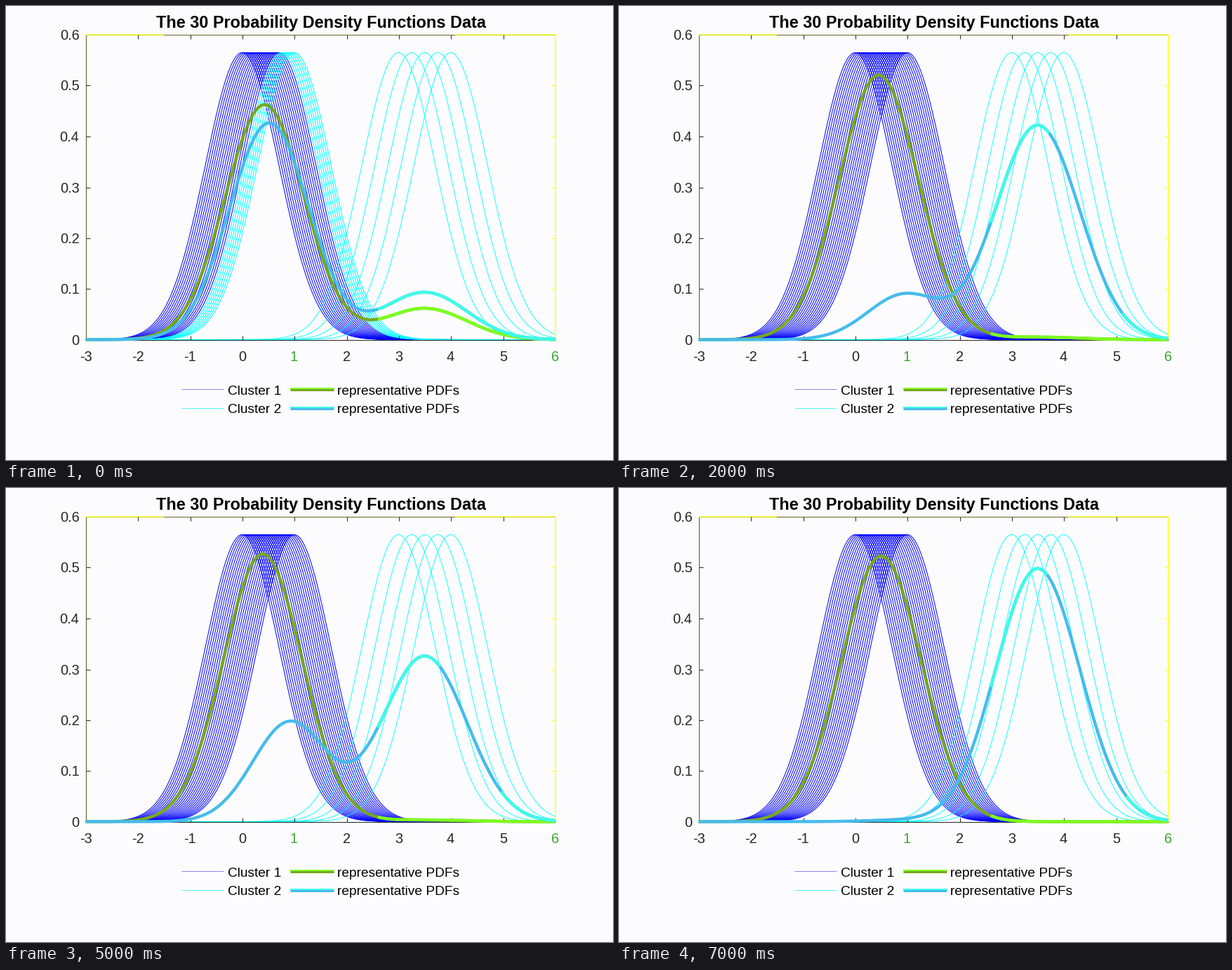
These frames come from a looping animation (865 px wide and 647 px high, 8000 ms). A matplotlib script:

```python
import numpy as np
import matplotlib.pyplot as plt
from matplotlib.animation import FuncAnimation
from matplotlib.patches import Circle, Rectangle

W, H, DPI = 865, 647, 100
PT = 72 / DPI  # points per pixel
LEFT, RIGHT, TOP, BASE = 113.5, 782.5, 40.5, 475.5

BG, INK, YELLOW, OLIVE = "#fcfcfe", "#262626", "#ffff20", "#6a6628"
BLUE, CYAN = "#0000ff", "#00ffff"
GREEN, LIME = "#77a81f", "#7dff20"
SKY, AQUA = "#45bcec", "#3ffbe9"

plt.rcParams["font.family"] = "Liberation Sans"
fig = plt.figure(figsize=(W / DPI, H / DPI), dpi=DPI, facecolor=BG)
ax = fig.add_axes([0, 0, 1, 1])
ax.set_xlim(0, W)
ax.set_ylim(H, 0)
ax.axis("off")


def px(x):
    return LEFT + (x + 3) * (RIGHT - LEFT) / 9


def py(y):
    return BASE - y * (BASE - TOP) / 0.6


def snap(v):
    return round(v - 0.5) + 0.5


def line(xs, ys, color, width=1.0, z=2):
    return ax.plot(xs, ys, color=color, lw=width * PT, zorder=z,
                   solid_capstyle="butt")[0]


def text(x, y, s, size, color=INK, **kw):
    ax.text(x, y, s, fontsize=size * PT, color=color, zorder=6,
            va="baseline", **kw)


# Densities
X = np.linspace(-3, 6, 901)
PX = px(X)


def gauss(mean, var=0.5):
    return np.exp(-(X - mean) ** 2 / (2 * var)) / np.sqrt(2 * np.pi * var)


NEAR = [gauss(m) for m in np.linspace(0, 1, 25)]
FAR = [gauss(m) for m in np.linspace(3, 4, 5)]
FAR_MEAN = np.mean(FAR, axis=0)


def representative(far, mean):
    """Average of all members: share `far` on the right, rest around mean."""
    edge = min(mean, 1 - mean)
    spread = edge ** 2 * (1 - edge) / (1 + edge)
    return (1 - far) * gauss(mean, 0.5 + spread) + far * FAR_MEAN


def ease(span, t):
    """Share between two key values, speeding up on a logistic curve."""
    a, b = (np.log(v / (1 - v)) for v in span)
    return 1 / (1 + np.exp(-a - (b - a) * t ** 1.78))


# Each run of the clustering: step count, then for both clusters
# the far share and the near centre at its start and end.
RUNS = [
    (3, [((.123, .010), (.43, .45)), ((.186, .842), (.52, .95))]),
    (5, [((.037, .0001), (.29, .50)), ((.227, .994), (.84, 1.0))]),
]
STEPS = [[representative(ease(far, t), np.interp(t, (0, 1), mean))
          for far, mean in clusters]
         for count, clusters in RUNS for t in np.linspace(0, 1, count)]


def distance(f, g):
    return np.sum((f - g) ** 2)


near_lines = [line(PX, py(f), BLUE) for f in NEAR]
for f in FAR:
    line(PX, py(f), CYAN, 0.9)
reps = [(line(PX, PX, base, 4.4, z), line(PX, PX, bright, 4.4, z))
        for base, bright, z in ((GREEN, LIME, 4), (SKY, AQUA, 5))]

# Frame, ticks and labels
line([LEFT, LEFT], [TOP, BASE], OLIVE, 1.2, 3)
line([LEFT, RIGHT], [BASE, BASE], INK, z=3)
line([LEFT, RIGHT], [TOP, TOP], OLIVE, z=3)
line([RIGHT, RIGHT], [TOP, BASE], YELLOW, 1.5, 3)
for xs in ([LEFT, 225], [640, RIGHT]):
    line(xs, [TOP, TOP], YELLOW, 1.5, 3)

for v in range(-3, 7):
    x = snap(px(v))
    if -3 < v < 6:
        line([x, x], [BASE, BASE - 6], INK, z=3)
        line([x, x], [TOP, TOP + 6], INK, z=3)
    text(x, 505.5, str(v), 20, "#3aa52e" if v in (1, 6) else INK, ha="center")

for i in range(7):
    y = snap(py(i / 10))
    if 0 < i < 6:
        line([LEFT, LEFT + 6], [y, y], INK, z=3)
        line([RIGHT, RIGHT - 6], [y, y], YELLOW, z=3)
    text(104.5, y + 7.5, f"{i / 10:g}", 20, ha="right")

text(448.5, 30.5, "The 30 Probability Density Functions Data", 23.5, "black",
     ha="center", weight="bold")

# Legend
for y, name, thin, base, bright in (
        (546, "Cluster 1", "#8d86ee", GREEN, LIME),
        (573, "Cluster 2", "#50f8fa", SKY, AQUA)):
    line([250, 310], [y, y], thin)
    line([405, 467], [y, y], base, 5)
    line([405, 467], [y - 1.5, y - 1.5], bright, 2)
    text(315.5, y + 7.5, name, 19.2, "black")
    text(471.5, y + 7.5, "representative PDFs", 19.2, "black")


def toolbar(y=229):
    """Small row of plot tools, shown for one step only."""
    grey, moss, leaf = "#6b6b64", "#6f8a62", "#6fd85a"
    parts = [ax.add_patch(Rectangle((438, y - 10), 139, 20, fc=BG, ec="none",
                                    zorder=7))]
    export, brush, tip, hand, zoom_in, zoom_out, home = np.linspace(448, 567, 7)

    def stroke(cx, xs, ys, color=grey):
        parts.append(line(cx + np.array(xs), y + np.array(ys), color, 1.3, 8))

    stroke(export, [-7, -7, 7, 7], [1, 6, 6, 3])
    stroke(export, [-5, -2, 1, 1, 6, 1, 1, -5], [3, -3, -4, -7, -2, 2, -1, 3])
    stroke(brush, [2, 1, -6, 5, 4, 4, 2], [-7, 0, 7, 7, 0, -7, -7])
    stroke(brush, [-2, 4], [2, 2])
    stroke(tip, [-7, 7, 7, -7, -7], [-7, -7, 6, 6, -7])
    for dy in (-2, 2):
        stroke(tip, [-4, 4], [dy, dy])
    for dx in (-4, -1, 2, 5):
        stroke(hand, [dx, dx], [abs(dx) - 8, 1])
    stroke(hand, [-7, -3, 3, 6, 6], [0, 7, 7, 3, -3])
    for cx, color in ((zoom_in, grey), (zoom_out, moss)):
        parts.append(ax.add_patch(Circle((cx - 2, y - 2), 5.5, fc="none",
                                         ec=color, lw=1.3 * PT, zorder=8)))
        stroke(cx, [2, 8], [2, 8], color)
        stroke(cx, [-5, 1], [-2, -2], color)
    stroke(zoom_in, [-2, -2], [-5, 1])
    stroke(home, [-8, 0, 8], [0, -8, 0], leaf)
    stroke(home, [-5, -5, -2, -2, 2, 2, 5, 5], [-2, 7, 7, 2, 2, 7, 7, -2], leaf)
    return parts


tools = toolbar()


def update(step):
    first, second = STEPS[step]
    for curve, f in zip(near_lines, NEAR):
        closer = distance(f, first) <= distance(f, second)
        curve.set_color(BLUE if closer else CYAN)
    for (base, bright), f in zip(reps, (first, second)):
        # the brighter tone covers the right side except steep descents
        lit = (X > 2.6) & (np.gradient(f, X) > -0.14)
        base.set_ydata(py(f))
        bright.set_ydata(np.where(lit, py(f), np.nan))
    for part in tools:
        part.set_visible(step == 1)
    return []


anim = FuncAnimation(fig, update, frames=len(STEPS), interval=1000,
                     init_func=lambda: update(0), repeat=True,
                     repeat_delay=0, blit=False)
plt.show()
```
